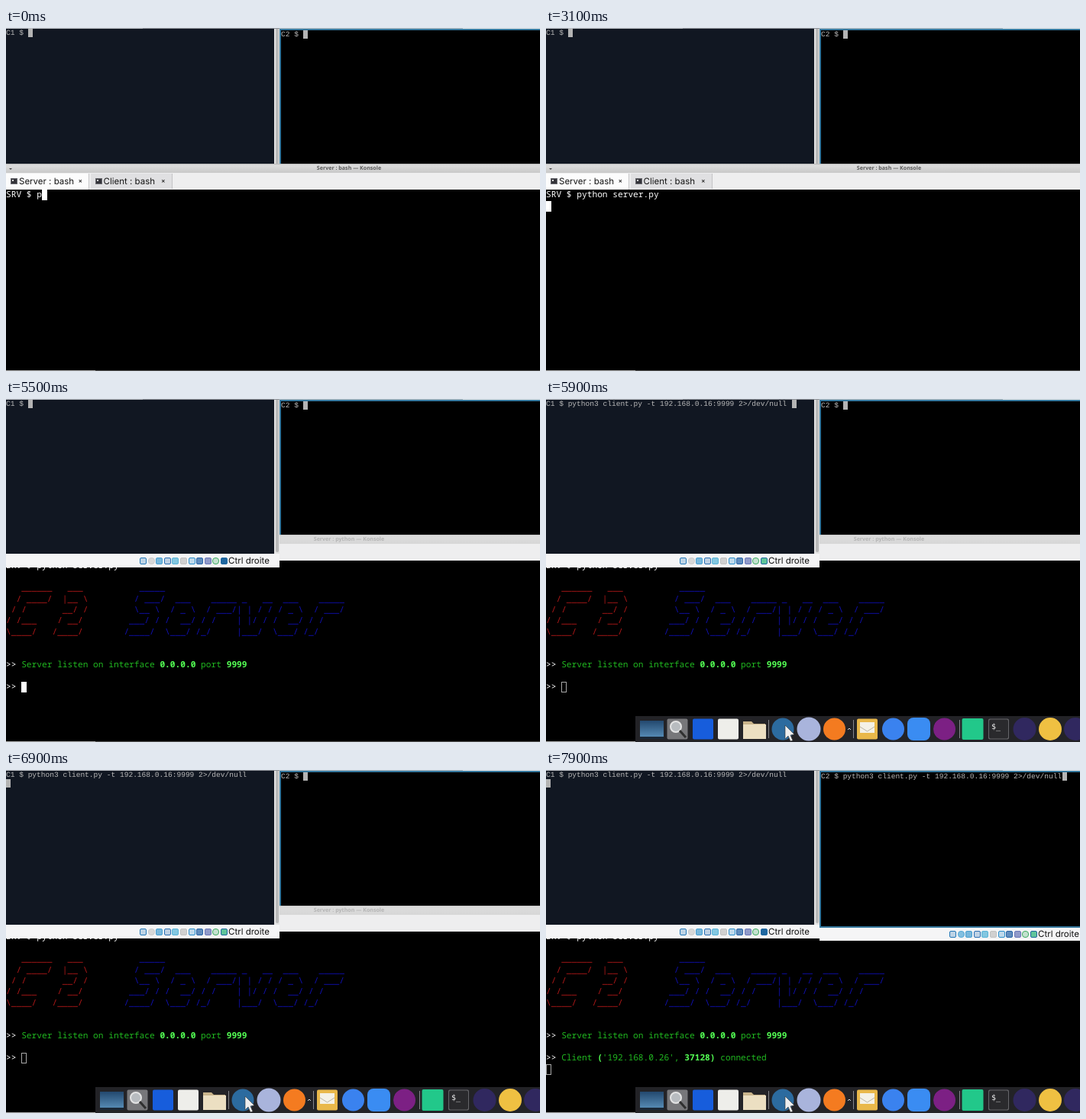
Recreate the animation shown at these times as an HTML page. Size 699x450 px, loop 8000 ms.

```html
<!DOCTYPE html>
<html lang="en">
<head>
<meta charset="utf-8">
<title>Terminals</title>
<style>
html, body { margin: 0; width: 100%; height: 100%; overflow: hidden; background: #000; }
#stage { position: relative; width: 699px; height: 450px; overflow: hidden; background: #000; text-rendering: geometricPrecision; }
#stage div, #stage svg, pre { position: absolute; margin: 0; box-sizing: border-box; white-space: pre; }

.konsole { left: 0; top: 178px; width: 699px; height: 272px; background: #000; z-index: 2; }
.title { left: 0; top: 0; width: 100%; height: 13px; background: linear-gradient(#b4b4b4, #dedede 15%, #c6c6c6); }
.title span { position: absolute; left: 349px; width: 200px; text-align: center; font: bold 7.1px/13px "Noto Sans", sans-serif; color: #5a5a5a; }
.title i { position: absolute; left: 4px; top: 6px; border: 2px solid transparent; border-top-color: #444; }
.inactive .title { background: linear-gradient(#c6c6c6, #dcdcdc 15%, #d6d6d6); }
.inactive .title span { color: #b4b4b4; }
.tabs { left: 0; top: 12px; width: 100%; height: 22px; background: #eeeeef; }
.tab { top: 1px; height: 20px; background: #e0e0e2; border-right: 1px solid #c4c4c6; font: 11.5px/20px Inter, sans-serif; color: #161616; padding-left: 17px; }
.tab.on { background: #fcfcfc; height: 21px; }
.tab .ico { left: 6px; top: 6px; width: 9px; height: 8px; background: #34343a; border: 1px solid #6b6b70; }
.tab .ico::after { content: ""; position: absolute; left: 1px; top: 1px; width: 2px; height: 2px; background: #ddd; }
.tab .x { right: 8px; top: 0; font: bold 9px/20px "Noto Sans", sans-serif; color: #333; }
.term { left: 0; top: 34.2px; font: 500 11.2px/14.45px "Noto Sans Mono", monospace; color: #fff; }
.term b { color: #54ff54; }
.g { color: #20b820; } .r { color: #b21818; } .b { color: #1010b4; }
.term .cur { width: 6.7px; height: 14px; background: #fff; }
.term .cur.hollow { background: none; border: 1px solid #a8a8a8; }
.edge { left: 0; top: 271px; width: 699px; height: 1px; background: linear-gradient(90deg, #a8a8a8 117px, #505050 0); }

.vm { top: 0; overflow: hidden; background: #f5f5f6; z-index: 1; }
.vm.up { z-index: 3; }
.vm .screen { color: #b8b8b8; font: 9.55px/11.2px "DejaVu Sans Mono", monospace; }
.vm .cur { width: 5.75px; height: 11px; background: #b4b4b4; }
.bar { left: 0; width: 100%; height: 18px; }
.bar span { position: absolute; left: 291px; font: 11.5px/18px Inter, sans-serif; color: #111; }
.bar i { position: absolute; top: 5px; width: 9px; height: 9px; box-sizing: border-box; border: 1px solid; border-radius: 2px; }
#c1 { left: 0; width: 358px; height: 221px; }
#c1 .screen { left: 0; top: 1px; width: 351px; height: 202px; background: #111722; }
#c1 .bar { top: 203px; }
#c1 .top { left: 0; top: 0; width: 100%; height: 1px; background: linear-gradient(90deg, #b9bcc2 179px, #8f939a 0); }
#c1 .scroll { left: 351px; top: 1px; width: 7px; height: 202px; background: #e4e4e4; }
#c1 .scroll::after { content: ""; position: absolute; left: 2px; top: 0; width: 4px; height: 200px; background: #bababa; border-radius: 0 0 2px 2px; }
#c2 { left: 358px; width: 341px; height: 224px; }
#c2 .screen { left: 0; top: 1px; width: 341px; height: 206px; background: #000; border: 2px solid #35789e; border-right: 0; }
#c2 .bar { top: 206px; }
#c2 .bar span { left: 286px; }
#c2 .top { left: 0; top: 0; width: 100%; height: 1px; background: linear-gradient(90deg, #b9c2c8 240px, #eee 0); }

#dock { left: 117px; top: 416px; width: 582px; height: 34px; z-index: 5; }
</style>
</head>
<body>
<div id="stage">
  <div class="vm" id="c1"></div>
  <div class="vm" id="c2"></div>
  <div class="konsole" id="konsole">
    <div class="title"><i></i><span id="title"></span></div>
    <div class="tabs">
      <div class="tab on" id="tab1"><div class="ico"></div><span></span><div class="x">×</div></div>
      <div class="tab" id="tab2"><div class="ico"></div><span>Client : bash</span><div class="x">×</div></div>
    </div>
    <pre class="term"><span id="out"></span><div class="cur" id="cur"></div></pre>
    <div class="edge"></div>
  </div>
  <svg id="dock" viewBox="117 416 582 34"></svg>
</div>
<script>
const LOOP = 8000;
const CHAR = 6.72, LINE = 14.45;
const $ = id => document.getElementById(id);
const span = (cls, text) => `<span class="${cls}">${text}</span>`;

// Last value whose start time has passed.
const at = (steps, t) => steps.reduce((v, [from, next]) => t >= from ? next : v, steps[0][1]);

const command = "python3 client.py -t 192.168.0.16:9999 2&gt;/dev/null";
const typed = [[0, "p"], [700, "py"], [800, "pyt"], [1000, "pyth"], [1100, "pytho"], [1300, "python"],
  [1400, "python "], [1500, "python s"], [1700, "python server.py "]];

const banner = [
  ["   ______   ___ ", "          _____"],
  ["  / ____/  |__ \\", "         / ___/  ___    _____ _   __  ___    _____"],
  [" / /       __/ /", "         \\__ \\  / _ \\  / ___/| | / / / _ \\  / ___/"],
  ["/ /___    / __/ ", "        ___/ / /  __/ / /    | |/ / /  __/ / /"],
  ["\\____/   /____/ ", "       /____/  \\___/ /_/     |___/  \\___/ /_/"]
].map(([c2, server]) => span("r", c2) + span("b", server)).join("\n");

const listen = "&gt;&gt; " + span("g", "Server listen on interface ") + "<b>0.0.0.0</b>" +
  span("g", " port ") + "<b>9999</b>";
const joined = span("g", "Client ") + "<b>(</b>" + span("g", "'192.168.0.26', ") + "<b>37128)</b>" +
  span("g", " connected");

// Server cursor as [column, row].
const serverCursor = [[0, null], [2800, [0, 1]], [3400, [0, 10]], [4600, [3, 11]], [7100, [0, 12]]];

function buildVm(id, name, iconX, firstTone) {
  const tones = ["#2478b8", firstTone, "#4a9fd0", "#2a6fb4", "#58b4d8", "#c2c2c2", "#2b8fcd", "#2a66a8", "#6b78b8", "#3dab62", "#1f67a0"];
  const icons = tones.map((c, i) => `<i style="left:${iconX + i * 10.6}px;color:${c};background:${c}${i % 3 ? "bb" : "44"};border-radius:${i == 1 || i == 9 ? 4 : 2}px"></i>`).join("");
  $(id).innerHTML = `<div class="screen"><pre></pre><div class="cur"></div></div>
    <div class="top"></div><div class="scroll"></div><div class="bar">${icons}<span>Ctrl droite</span></div>`;
  const pre = $(id).querySelector("pre"), cur = $(id).querySelector(".cur"), key = $(id).querySelector(".bar i:last-of-type");
  return (text, col, row, raised, captured) => {
    setHtml(pre, name + " $ " + text);
    cur.style.left = col * 5.75 + "px";
    cur.style.top = row * 11.2 + "px";
    $(id).classList.toggle("up", raised);
    key.style.background = captured ? "#5fc49a" : "#1f67a0";
  };
}

function setHtml(el, html) {
  if (el.html !== html) el.innerHTML = el.html = html;
}

function buildDock() {
  const box = (x, c, w = 27, r = 2) => `<rect x="${x - w / 2}" y="${433 - w / 2}" width="${w}" height="${w}" rx="${r}" fill="${c}"/>`;
  const disc = (x, c, r = 14.5) => `<circle cx="${x}" cy="433" r="${r}" fill="${c}"/>`;
  const line = x => `<path d="M${x} 421v24" stroke="#85858a"/>`;
  $("dock").innerHTML = `<linearGradient id="sky" x2="0" y2="1"><stop stop-color="#23486e"/><stop offset="1" stop-color="#5c93bd"/></linearGradient>` +
    `<rect x="117" y="416" width="582" height="34" fill="#232327"/>` +
    `<rect x="123" y="422" width="31" height="24" fill="url(#sky)"/><path d="M123 444.500h31" stroke="#1a2836" stroke-width="3"/>` +
    box(172, "#77777a") + `<circle cx="170" cy="430" r="7" fill="#b8bcc0" stroke="#e4e4e4" stroke-width="2"/><path d="M175 435l8 9" stroke="#303030" stroke-width="3"/>` +
    box(205.5, "#175ddc") + box(238.5, "#eeeeea") +
    `<path d="M258 423h11l3 3h15v20h-29z" fill="#c9b48b"/><path d="M258 427h30v19h-30z" fill="#ecdfc2"/>` + line(291.5) +
    disc(310, "#2c6b9f") + disc(344, "#a9b4dc", 15.5) + disc(377.5, "#f47b20") +
    `<path d="M395 434l2-2 2 2" fill="none" stroke="#ddd"/>` + line(402.5) +
    box(420.5, "#e9b84a") + `<path d="M411 424h19v14h-19z" fill="#f4f1e6"/><path d="M411 430l9.500 6 9.500-6" fill="none" stroke="#b9b4a4"/>` +
    disc(454.5, "#3a82ef") + box(488, "#3a8cf2", 30, 8) + disc(521.5, "#7c2084") + line(541.5) +
    box(558.5, "#22c88a", 28) + box(592.5, "#66666a", 27) + box(592.5, "#2a2a2d", 25) +
    `<text x="583" y="433" font-family="DejaVu Sans Mono, monospace" font-size="10" fill="#eee">$_</text>` +
    disc(626.5, "#30285f", 15) + disc(660, "#efc042", 15) + disc(693, "#30285f", 15) +
    `<path d="M313 428v18l4-4 3 7 3-1-3-7 5-1z" fill="#eee" stroke="#333" stroke-width=".6"/>`;
}

const showC1 = buildVm("c1", "C1", 175, "#cccccc");
const showC2 = buildVm("c2", "C2", 170, "#58abd8");
buildDock();

function showServer(t) {
  const input = at(typed, t);
  let text = "SRV $ " + input;
  if (t >= 3400) text += "\n\n" + banner + "\n\n\n" + listen;
  if (t >= 4600) text += "\n\n&gt;&gt; ";
  if (t >= 7100) text += joined;
  setHtml($("out"), text);

  const [col, row] = at(serverCursor, t) || [6 + input.length, 0];
  $("cur").style.left = col * CHAR + "px";
  $("cur").style.top = row * LINE + .3 + "px";
  $("cur").classList.toggle("hollow", t >= 5700);

  const app = t < 3300 ? "bash" : "python";
  const split = t < 3300 ? 109 : 121;
  $("title").textContent = `Server : ${app} — Konsole`;
  $("tab1").children[1].textContent = "Server : " + app;
  $("tab1").style.width = split + "px";
  $("tab2").style.left = split + 1.5 + "px";
  $("tab2").style.width = "107px";
  $("konsole").classList.toggle("inactive", t >= 5500);
}

function draw(t) {
  showServer(t);
  const [text1, col1, row1] = at([[0, ["", 5, 0]], [5900, [command, 56, 0]], [6900, [command, 0, 1]]], t);
  showC1(text1, col1, row1, t >= 5500, t >= 5700 && t < 7600);
  const [text2, col2] = at([[0, ["", 5]], [7800, [command, 55]]], t);
  showC2(text2, col2, 0, t >= 7600, t >= 7600);
  $("dock").style.visibility = t >= 5800 ? "visible" : "hidden";
}

const start = performance.now();
function frame() {
  draw((performance.now() - start) % LOOP);
  requestAnimationFrame(frame);
}
frame();
</script>
</body>
</html>
```
